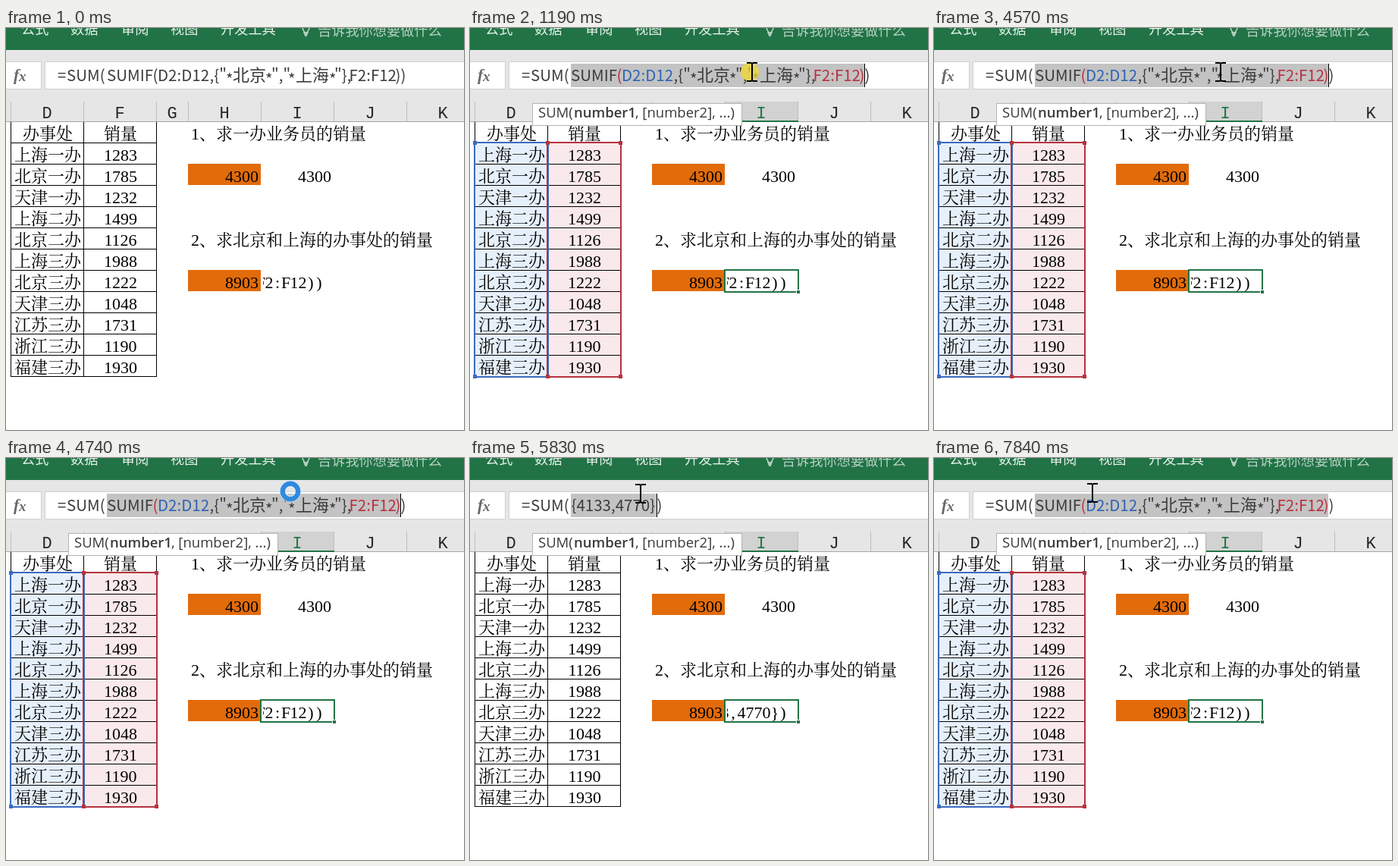
An HTML page that plays this animation: 604x530 px, repeating every 8000 ms.

```html
<!DOCTYPE html>
<html lang="zh">
<head>
<meta charset="utf-8">
<style>
html, body { margin: 0; width: 100%; height: 100%; overflow: hidden; background: #fff; }
svg { display: block; width: 604px; height: 530px; }
text { white-space: pre; }
.cell { font: 22px "Liberation Serif", "Noto Serif CJK SC", "Noto Sans CJK SC", "Noto Sans CJK", serif; fill: #000; }
.col { font: 22px "Liberation Mono", monospace; fill: #262626; text-anchor: middle; }
.bar { font: 300 20.5px "Noto Sans CJK SC", "Noto Sans CJK", "Noto Sans", sans-serif; fill: #3c3c3c; }
.han { font-size: 22px; }
.tab { font: 18.2px "Noto Sans CJK SC", "Noto Sans CJK", sans-serif; fill: #e8f1ec; }
.tip { font: 18.5px "Open Sans", sans-serif; fill: #3a3a3a; }
.strong { font-weight: 600; }
.fx { font: italic bold 22px "Liberation Serif", serif; fill: #6a6a6a; }
.edit .blue { fill: #2f62b5; }
.edit .red { fill: #b8303f; }
.end { text-anchor: end; }
.mid { text-anchor: middle; }
</style>
</head>
<body>
<svg id="stage" viewBox="0 0 604 530"></svg>
<script>
const GREEN = '#217346', BLUE = '#3a6bc0', RED = '#b5333f';
const stage = document.getElementById('stage');

const rect = (x, y, w, h, fill, extra = '') =>
  `<rect x="${x}" y="${y}" width="${w}" height="${h}" fill="${fill}" ${extra}/>`;
const text = (x, y, s, cls, extra = '') =>
  `<text x="${x}" y="${y}" class="${cls}" ${extra}>${s}</text>`;
const group = (id, body) => `<g id="${id}">${body}</g>`;
const glyphRow = (x, y, s) =>
  [...s].map((c, i) => text(x + 5 + i * 11, y, c, 'cell mid')).join('');

const tabs = [[20, '公式'], [85, '数据'], [152, '审阅'], [217, '视图'], [283, '开发工具']];
const ribbon = rect(0, 0, 604, 29, GREEN) +
  tabs.map(([x, s]) => text(x, 7.5, s, 'tab')).join('') +
  text(411, 9.5, '告诉我你想要做什么', 'tab', 'style="fill:#b5d0c1"') +
  '<path d="M391 -1Q391 2 393 4V6H398V4Q400 2 400 -1M393 8H398M394 10H397" fill="none" stroke="#dcebe2" stroke-width="1.3"/>';

const formulaBar = rect(0, 29, 604, 95, '#e6e6e6') +
  rect(-1, 44.5, 47.5, 36, '#fff', 'stroke="#d0d0d0"') +
  rect(51.5, 44.5, 560, 36, '#fff', 'stroke="#d0d0d0"') +
  text(10, 69, 'f', 'fx') + text(17, 70, 'x', 'fx', 'style="font-size:19px"');

const columns = [[54, 'D'], [150, 'F'], [219, 'G'], [288, 'H'], [384, 'I'], [480, 'J'], [576, 'K']];
const header = [6, 102, 198, 240, 336, 432, 528]
  .map(x => rect(x, 97, 1, 27, '#bdbdbd')).join('') +
  rect(0, 123, 604, 1, '#a6a6a6') +
  columns.map(([x, s]) => text(x, 119, s, 'col')).join('');

const rows = [['办事处', '销量'], ['上海一办', 1283], ['北京一办', 1785], ['天津一办', 1232],
  ['上海二办', 1499], ['北京二办', 1126], ['上海三办', 1988], ['北京三办', 1222],
  ['天津三办', 1048], ['江苏三办', 1731], ['浙江三办', 1190], ['福建三办', 1930]];
const table = rows.map(([office, sales], i) => {
  const y = 147 + 28 * i;
  return text(55, y, office, 'cell mid') + text(151, y, sales, 'cell mid') +
    rect(6, 151 + 28 * i, 193, 1, '#000');
}).join('') + [6, 102, 198].map(x => rect(x, 124, 1, 336, '#000')).join('');

const answers = rect(240, 179, 96, 28, '#e26b0a') + rect(240, 319, 96, 28, '#e26b0a') +
  text(244, 147, '1、求一办业务员的销量', 'cell') +
  text(333, 203, '4300', 'cell end') + text(429, 203, '4300', 'cell end') +
  text(244, 287, '2、求北京和上海的办事处的销量', 'cell') +
  text(333, 343, '8903', 'cell end');

const formulaParts = [[133, 'SUMIF'], [193.5, '(', 'red'], [200, 'D2:D12', 'blue'], [268.5, ',{"'],
  [290, '*'], [299, '北京', 'han'], [342, '*'], [350, '","'], [372, '*'], [382, '上海', 'han'],
  [426, '*'], [433, '"},'], [452.5, 'F2:F12', 'red'], [513.5, ')', 'red'], [520.5, ')']];
const formula = formulaParts.map(([x, s, cls = '']) =>
  text(x, s === '*' ? 75 : 70, s, 'bar ' + cls)).join('');
const result = text(133.5, 70, '{4133,4770}', 'bar') + text(246.5, 70, ')', 'bar');

// borders cover the grid line and the pixel outside it
const frame = (x, y, w, h, c) => rect(x, y, w, h, 'none', `stroke="${c}" stroke-width="2"`);
const handle = (x, y, c) => rect(x - 2, y - 2, 5, 5, c);
const ends = [151, 459];
const ranges = frame(6, 151, 97, 309, BLUE) + frame(102, 151, 97, 309, RED) +
  ends.map(y => handle(6, y, BLUE) + handle(102, y, RED) + handle(198, y, RED)).join('');
const shades = rect(7, 152, 95, 307, '#e6f0fb') + rect(103, 152, 95, 307, '#fae9ea');
const traces = ends.map(y => rect(5, y - 1, 3, 3, '#7f9fd6') + rect(101, y - 1, 4, 4, '#8a7f9f') +
  rect(197, y - 1, 3, 3, '#d9a050')).join('');

const active = rect(337, 97, 95, 26, '#d2d2d2') + rect(336, 122, 97, 2, GREEN) +
  text(384, 119, 'I', 'col', `style="fill:${GREEN}"`) +
  frame(336, 319, 97, 29, GREEN) +
  rect(430.5, 345.5, 5, 5, GREEN, 'stroke="#fff"') +
  rect(82.5, 99.5, 276, 29, '#fff', 'stroke="#b4b4b4"') +
  text(90, 118, 'SUM(', 'tip') + text(137, 118, 'number1', 'tip strong') +
  text(218, 118, ', [number2], ...)', 'tip');

const ibeam = '<path d="M-7 -12H-1.5L0 -11L1.5 -12H7M0 -11V11M-7 12H-1.5L0 11L1.5 12H7" fill="none" stroke="#000" stroke-width="2"/>';
const cross = '<path d="M-3 -9H3V-3H9V3H3V9H-3V3H-9V-3H-3Z" fill="#fff" stroke="#222" stroke-width="1.5"/>';
const ring = '<circle r="10" fill="none" stroke="#e4f0fb" stroke-width="8"/><circle r="10.2" fill="none" stroke="#2f8ade" stroke-width="6.4"/>';

stage.innerHTML = rect(0, 0, 604, 530, '#fff') + ribbon + formulaBar + header +
  '<clipPath id="cellClip"><rect x="339" y="320" width="93" height="27"/></clipPath>' +
  group('shades', shades) + table + answers +
  '<g clip-path="url(#cellClip)">' +
  group('cellFormula', glyphRow(331, 343, 'F2:F12))')) +
  group('cellResult', glyphRow(331, 343, '3,4770})')) + '</g>' +
  group('ranges', ranges) + group('traces', traces) + group('active', active) +
  rect(133, 47, 387, 31, '#c3c3c3', 'id="selection"') +
  text(68, 70, '=', 'bar') + text(80, 70, 'SUM(', 'bar') +
  group('formula', formula) + group('result', result) +
  rect(520, 47, 1, 31, '#000', 'id="caret"') +
  '<circle id="glow" cx="369" cy="58" r="12" fill="#f0d92c" opacity=".75"/>' +
  group('cursor', group('ibeam', ibeam) + group('cross', cross) + group('ring', ring));

const el = {};
for (const node of stage.querySelectorAll('[id]')) el[node.id] = node;
const show = (id, on) => { el[id].style.display = on ? '' : 'none'; };
const step = (list, t) => list.filter(s => s[0] <= t).pop();

// time, cursor shape, x, y
const moves = [[0, ''], [230, 'cross', 458, 461], [310, 'cross', 428, 330], [390, 'cross', 390, 195],
  [460, 'cross', 376, 143], [600, 'cross', 375, 136], [660, 'cross', 374, 118], [730, 'cross', 373, 98],
  [790, 'ibeam', 372, 78], [860, 'ibeam', 371, 64], [920, 'ibeam', 372, 58], [4500, 'ibeam', 375, 58],
  [4570, 'ibeam', 378, 58], [4740, 'ring', 375, 44], [4830, 'ibeam', 378, 58], [5670, 'ibeam', 340, 56],
  [5750, 'ibeam', 275, 50], [5830, 'ibeam', 225, 47], [5910, 'ibeam', 209, 46],
  [7220, 'ring', 206, 44], [7310, 'ibeam', 209, 46]];
// time, caret opacity
const blinks = [[0, 0], [1190, 1], [1710, 0], [2090, .5], [2170, 1], [2720, .5], [2790, 0],
  [3180, .5], [3250, 1], [3790, 0], [4200, .5], [4280, 1], [5290, .5], [5360, 0], [5750, 1],
  [6370, 0], [6750, .5], [6840, 1], [7840, 0]];

function draw(t) {
  const editing = t >= 1190;
  const evaluated = t >= 4830 && t < 7310;
  const marked = editing && !evaluated;
  stage.classList.toggle('edit', editing);
  show('active', editing);
  show('selection', editing);
  show('shades', marked);
  show('ranges', marked);
  show('traces', t >= 4830 && t < 4890);
  show('formula', !evaluated);
  show('cellFormula', !evaluated);
  show('result', evaluated);
  show('cellResult', evaluated);
  show('glow', t >= 1090 && t < 4500);
  el.selection.setAttribute('width', evaluated ? 113 : 387);
  el.caret.setAttribute('x', evaluated ? 246 : 520);
  el.caret.setAttribute('opacity', step(blinks, t)[1]);
  const [, shape, x = 0, y = 0] = step(moves, t);
  for (const id of ['ibeam', 'cross', 'ring']) show(id, id === shape);
  el.cursor.setAttribute('transform', `translate(${x} ${y})`);
}

const start = performance.now();
function tick() {
  draw((performance.now() - start) % 8000);
  requestAnimationFrame(tick);
}
tick();
</script>
</body>
</html>
```
